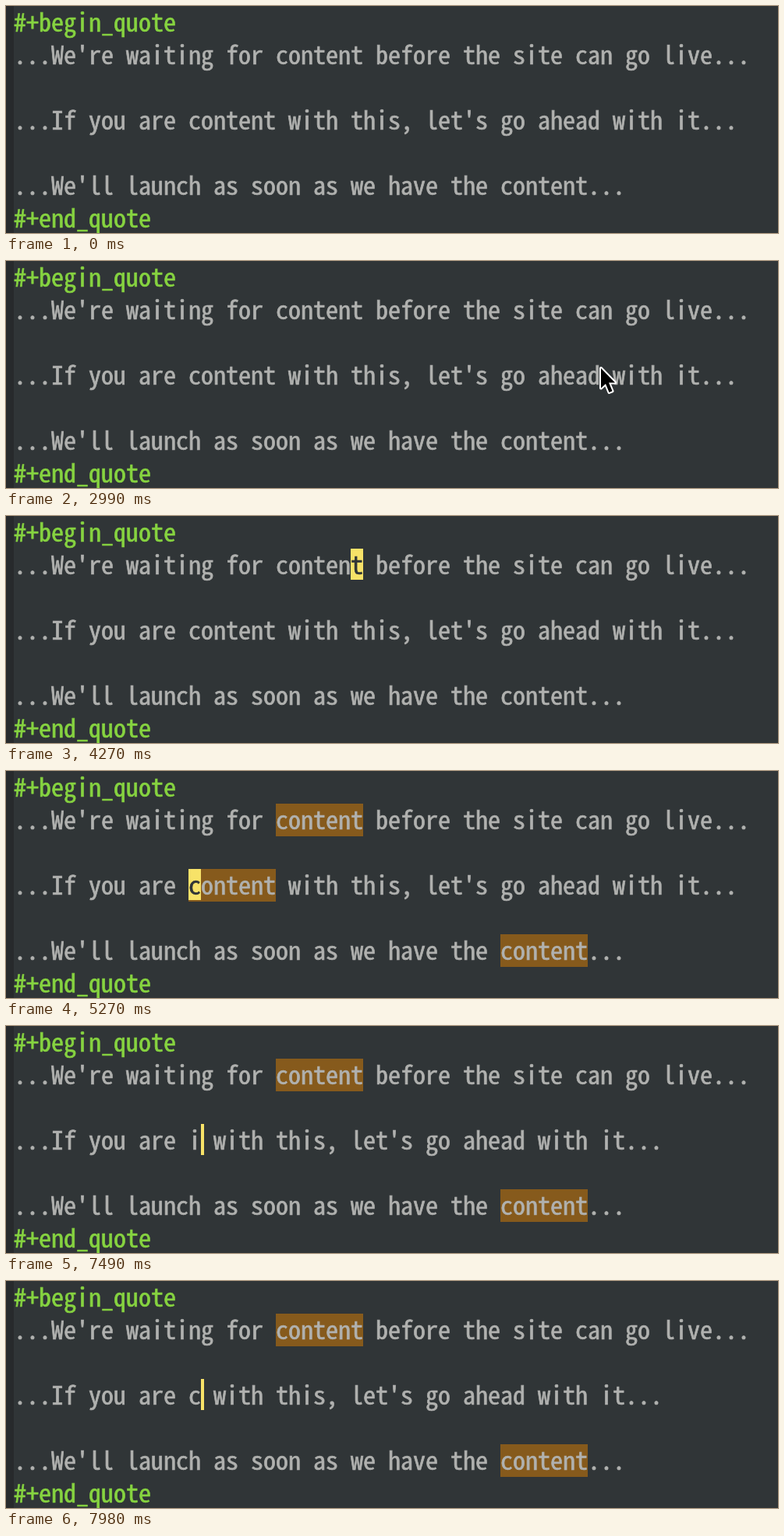
Recreate the animation shown at these times as an HTML page. Size 990 px wide and 292 px high, loop 8000 ms.

```html
<!DOCTYPE html>
<html lang="en">
<head>
<meta charset="utf-8">
<title>Editing a quote block</title>
<style>
  html, body { margin: 0; width: 100%; height: 100%; overflow: hidden; background: #303537; }
  svg { display: block; width: 990px; height: 292px; }
  text {
    font: 32px "Noto Sans Mono CJK JP", "Noto Sans Mono CJK SC", "Noto Sans Mono", monospace;
    font-variant-ligatures: none; font-kerning: none;
    white-space: pre; fill: #b0b1af; stroke: #b0b1af; stroke-width: .7;
  }
  .key { fill: #86d340; stroke: #86d340; }
  .dark { fill: #303537; stroke: #303537; }
  .item { fill: #f0f0ee; stroke: #f0f0ee; }
  .match { fill: #b9ebe6; stroke: #b9ebe6; }
  .num { fill: #b4d6d3; stroke: #b4d6d3; }
  .tag { font: 17px "Open Sans", "Noto Sans", sans-serif; fill: #c2c2c2; stroke: none; }
</style>
</head>
<body>
<svg id="stage" viewBox="0 0 990 292" xmlns="http://www.w3.org/2000/svg"></svg>
<script>
const LOOP = 8000, COL = 16, ROW = 42, LEFT = 10, BASE = 33;
const YELLOW = '#f7e268', BROWN = '#865a1c';
const stage = document.getElementById('stage');

function add(tag, attrs, parent = stage) {
  const el = document.createElementNS('http://www.w3.org/2000/svg', tag);
  for (const k in attrs) el.setAttribute(k, attrs[k]);
  parent.appendChild(el);
  return el;
}
const colX = col => LEFT + col * COL;
const box = (x, y, width, height, fill, parent) =>
  add('rect', { x, y, width, height, fill }, parent);

function write(str, col, row, cls = '', parent = stage) {
  const el = add('text', { x: colX(col), y: row * ROW + BASE, class: cls }, parent);
  el.textContent = str;
  return el;
}

// Show an element only during the given [from, to] spans.
// Switches come half a millisecond early so rounding never delays them.
function show(el, ...spans) {
  let opacity = spans[0][0] === 0 ? 1 : 0;
  const keys = [{ offset: 0, opacity }];
  for (const ms of spans.flat()) {
    if (ms === 0 || ms === LOOP) continue;
    opacity = 1 - opacity;
    keys.push({ offset: (ms - .5) / LOOP, opacity });
  }
  keys.push({ offset: 1, opacity });
  keys.forEach(k => k.easing = 'steps(1, end)');
  el.animate(keys, { duration: LOOP, iterations: Infinity });
  return el;
}

// Background, fringe and word highlights
box(0, 0, 990, 292, '#303537');
box(0, 0, LEFT, 292, '#272a2c');
const mark = (col, row, end) =>
  show(box(colX(col), row * ROW, 7 * COL, ROW, BROWN), [5270, end]);
mark(21, 1, LOOP);
mark(14, 3, 7120);
mark(39, 5, LOOP);

// Buffer text
write('#+begin_quote', 0, 0, 'key');
write("...We're waiting for content before the site can go live...", 0, 1);
write('...If you are ', 0, 3);
write("...We'll launch as soon as we have the content...", 0, 5);
write('#+end_quote', 0, 6, 'key');

const rest = " with this, let's go ahead with it...";
show(write('content' + rest, 14, 3), [0, 7120]);
show(write(rest, 14, 3), [7120, 7490], [7860, 7980]);
show(write('i' + rest, 14, 3), [7490, 7860]);
show(write('c' + rest, 14, 3), [7980, LOOP]);

// Text cursors: block, half block, bar
function block(ch, col, row) {
  const g = add('g', {});
  box(colX(col), row * ROW, COL, 40, YELLOW, g);
  write(ch, col, row, 'dark', g);
  return g;
}
show(block('t', 27, 1), [3540, 3720], [4270, 5270]);
show(block('c', 14, 3), [5270, 5770], [6330, 6760]);
show(box(colX(14), 146, COL, 20, YELLOW), [6940, 7120]);
show(box(colX(14), 126, 4, 40, YELLOW), [7120, 7490], [7860, 7980]);
show(box(colX(15), 126, 4, 40, YELLOW), [7490, 7860], [7980, LOOP]);

// Completion popup
const popup = add('g', {});
box(202, 168, 688, 124, '#414141', popup);
box(202, 168, 688, ROW, '#515151', popup);
['images', 'immerumkehren', 'import'].forEach((word, i) => {
  const row = 4 + i;
  add('text', { x: 203.5, y: row * ROW + 27, class: 'tag' }, popup).textContent = 'abc';
  write(word[0], 14, row, 'match', popup);
  write(word.slice(1), 15, row, 'item', popup);
  write(i + 1, 53, row, 'num', popup);
});
show(popup, [7740, 7860]);

// Mouse pointers
function pointer(d, x, y, ...spans) {
  const g = add('g', { transform: `translate(${x} ${y})` });
  add('path', { d, fill: '#000', stroke: '#fff', 'stroke-width': 4,
    'stroke-linejoin': 'round', 'paint-order': 'stroke' }, g);
  show(g, ...spans);
}
const arrow = 'M2 4V29.5L8 24L12.5 35L16.5 33.3L12 22.5H20Z';
const beam = 'M2 2H6L9 4L12 2H16V4.5H13L10.3 7V16H13V18.5H10.3V29L13 31.5H16V34H12L9 32L6 34H2V31.5H5L7.7 29V18.5H5V16H7.7V7L5 4.5H2Z';
pointer(arrow, 541, 194, [310, 370]);
pointer(arrow, 761, 134, [2990, 3050]);
pointer(arrow, 391, 100, [3050, 3110]);
pointer(arrow, 391, 104, [3420, 3480]);
pointer(beam, 428, 38, [3480, 3900]);
pointer(beam, 688, 38, [3900, 3960]);
</script>
</body>
</html>
```
